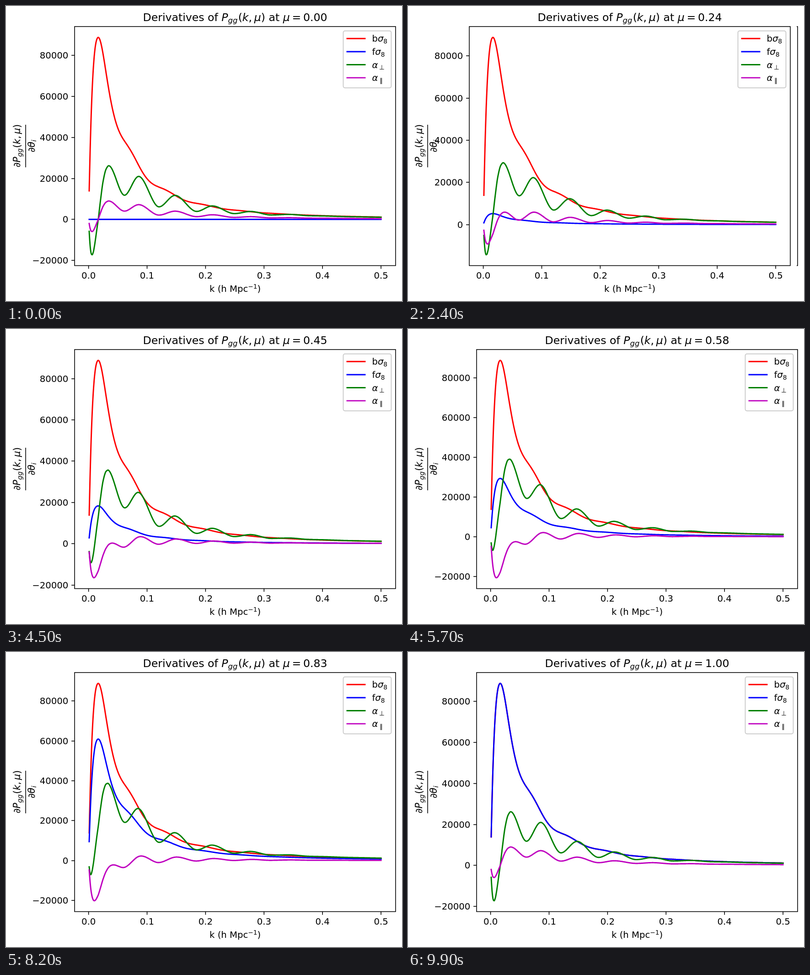
Recreate the animation shown at these times as an HTML page. Size 866 by 646 pixels, loop 10 s.

```html
<!DOCTYPE html>
<html lang="en">
<head>
<meta charset="utf-8">
<title>Power spectrum derivatives</title>
<style>
  html, body { margin: 0; width: 100%; height: 100%; overflow: hidden; background: #fff; }
  svg { display: block; width: 866px; height: 646px; }
  text { font: 19.67px "DejaVu Sans", sans-serif; fill: #000; }
  .title { font-size: 23.6px; }
  .frac { font-size: 20.65px; }
  .it { font-style: italic; }
  .small { font-size: 13.77px; }
  .title .small { font-size: 16.5px; }
  .frac .small { font-size: 14.46px; }
  .mid { text-anchor: middle; }
  .end { text-anchor: end; }
  .axis { fill: none; stroke: #000; stroke-width: 1.57; }
  .curve { fill: none; stroke-width: 2.95; stroke-linejoin: round; stroke-linecap: square; }
</style>
</head>
<body>
<svg viewBox="0 0 866 646">
  <g id="plot">
    <g id="curves"></g>
    <g id="xticks"></g>
    <g id="yticks"></g>
    <rect class="axis" x="150" y="45" width="702" height="523.5"/>
    <text class="title mid" x="501" y="33.2">Derivatives of <tspan class="it">P</tspan><tspan class="it small" dy="4">gg</tspan><tspan dx="1.2" dy="-4">(</tspan><tspan class="it">k</tspan>,<tspan class="it" dx="4.7">μ</tspan>) at <tspan class="it">μ</tspan><tspan dx="4.7">=</tspan><tspan id="mu" dx="4.7">0.00</tspan></text>
    <text x="445" y="626">k (h Mpc<tspan class="small" dy="-7.2">−1</tspan><tspan dy="7.2">)</tspan></text>
    <g id="legend">
      <rect x="737.5" y="54.6" width="105" height="124.6" rx="3.9" fill="#fff" fill-opacity=".8" stroke="#ccc" stroke-width="1.97"/>
    </g>
  </g>
  <g transform="translate(31 353.3) rotate(-90)">
    <text class="frac"><tspan class="it">∂P</tspan><tspan class="it small" dy="3.7">gg</tspan><tspan dx="1" dy="-3.7">(</tspan><tspan class="it">k</tspan>,<tspan class="it" dx="4.1">μ</tspan>)</text>
  </g>
  <path class="axis" d="M43 260V353.3"/>
  <g transform="translate(62.6 320.3) rotate(-90)">
    <text class="frac it">∂θ<tspan class="small" dy="3.7">i</tspan></text>
  </g>
  <!-- edge of the wide layout that stays visible beside the narrow one -->
  <path id="edge" class="axis" d="M850 45H852V568.5H850"/>
</svg>
<script>
const $ = id => document.getElementById(id);
const BOX = { left: 150, top: 45, width: 702, height: 523.5 };
const BOTTOM = BOX.top + BOX.height;
const K0 = 0.001, K1 = 0.5, N = 1000;
const FRAMES = 100, STEP = 100;
const COLORS = ['#f00', '#00f', '#008000', '#bf00bf'];

// Turning points of the transverse derivative at mu = 0: [k, value]
const KNOTS = [
  [.001, -5800], [.002, -10550], [.003, -14000], [.004, -16100], [.005, -17050],
  [.0061, -17250], [.008, -16000], [.01, -13050], [.012, -9250], [.014, -5050],
  [.0165, 0], [.02, 8500], [.025, 18900], [.03, 24600], [.0344, 26180],
  [.0613, 11800], [.0856, 20980], [.1204, 6130], [.1477, 11720], [.1848, 3900],
  [.2114, 6570], [.2493, 2830], [.277, 3880], [.312, 2150], [.343, 2430],
  [.376, 1800], [.405, 1650], [.44, 1350], [.47, 1200], [.5, 1050]
];

// Monotone cubic interpolation
function spline(pts) {
  const sec = pts.slice(1).map((p, i) => (p[1] - pts[i][1]) / (p[0] - pts[i][0]));
  const slope = pts.map((_, i) => {
    const a = sec[i - 1] ?? sec[i], b = sec[i] ?? a;
    return a * b <= 0 ? 0 : 2 * a * b / (a + b);
  });
  return x => {
    let i = 0;
    while (i < pts.length - 2 && x > pts[i + 1][0]) i++;
    const h = pts[i + 1][0] - pts[i][0], t = (x - pts[i][0]) / h, u = 1 - t;
    return pts[i][1] * (1 + 2 * t) * u * u + slope[i] * h * t * u * u
      + pts[i + 1][1] * t * t * (3 - 2 * t) - slope[i + 1] * h * t * t * u;
  };
}

const ks = Array.from({ length: N }, (_, i) => K0 + (K1 - K0) * i / (N - 1));
const base = ks.map(spline(KNOTS));

// The spectrum is the integral of -base/k, pinned at its start, peak and end
const START = 13900, PEAK = 88800, END = 1150;
const sums = [0];
for (let i = 1; i < N; i++) {
  sums[i] = sums[i - 1] - (base[i] / ks[i] + base[i - 1] / ks[i - 1]) / 2 * (ks[i] - ks[i - 1]);
}
const crest = Math.max(...sums), crestAt = sums.indexOf(crest), tail = sums[N - 1];
const power = sums.map((v, i) => i < crestAt
  ? START + (PEAK - START) * v / crest
  : END + (PEAK - END) * (v - tail) / (crest - tail));

const px = k => BOX.left + BOX.width * ((k - K0) / (K1 - K0) + .05) / 1.1;

function curvesAt(mu) {
  const m2 = mu * mu, warp = .898 * m2 * (1 - m2);
  return [
    power,
    power.map(p => p * m2),
    base.map((g, i) => g + warp * power[i]),
    base.map((g, i) => .343 * g - warp * power[i])
  ];
}

const NS = 'http://www.w3.org/2000/svg';
const paths = COLORS.map(color => {
  const p = document.createElementNS(NS, 'path');
  p.setAttribute('class', 'curve');
  p.setAttribute('stroke', color);
  $('curves').append(p);
  return p;
});

$('xticks').innerHTML = [0, .1, .2, .3, .4, .5].map(k => {
  const x = px(k).toFixed(1);
  return `<path class="axis" d="M${x} ${BOTTOM}v6.9"/><text class="mid" x="${x}" y="596.6">${k.toFixed(1)}</text>`;
}).join('');

const sigma = '<tspan class="it">σ</tspan><tspan class="small" dy="3.6">8</tspan>';
const alpha = (sign, x) => `<tspan class="it">α</tspan><tspan class="small" x="${x}" dy="3.6">${sign}</tspan>`;
const labels = ['b' + sigma, 'f' + sigma, alpha('⊥', 816), alpha('∥', 817)];
$('legend').innerHTML += labels.map((label, i) => {
  const y = 71.3 + 28.6 * i;
  return `<path class="curve" stroke="${COLORS[i]}" d="M746 ${y}h39"/><text x="800.4" y="${y + 7}">${label}</text>`;
}).join('');

function draw(frame) {
  const mu = frame / (FRAMES - 1), curves = curvesAt(mu);
  const all = curves.flat();
  const min = Math.min(...all), max = Math.max(...all);
  const pad = (max - min) * .05, lo = min - pad, hi = max + pad;
  const py = v => BOX.top + BOX.height * (hi - v) / (hi - lo);

  curves.forEach((c, n) => paths[n].setAttribute('d',
    'M' + c.map((v, i) => px(ks[i]).toFixed(2) + ' ' + py(v).toFixed(2)).join('L')));

  let ticks = '';
  for (let v = Math.ceil(lo / 20000) * 20000; v < hi; v += 20000) {
    const y = Math.round(py(v));
    const label = (v < 0 ? '−' : '') + Math.abs(v);
    ticks += `<path class="axis" d="M${BOX.left} ${y}h-6.9"/><text class="end" x="136.2" y="${y + 7.2}">${label}</text>`;
  }
  $('yticks').innerHTML = ticks;
  $('mu').textContent = mu.toFixed(2);

  // Without a negative tick label the layout is narrower
  const narrow = lo > -20000;
  $('plot').setAttribute('transform', `translate(${narrow ? -16 : 0} 0)`);
  $('edge').style.display = narrow ? '' : 'none';
}

let shown = -1;
const begin = performance.now();
function tick() {
  const frame = Math.floor((performance.now() - begin) / STEP) % FRAMES;
  if (frame !== shown) draw(shown = frame);
  requestAnimationFrame(tick);
}
tick();
</script>
</body>
</html>
```
